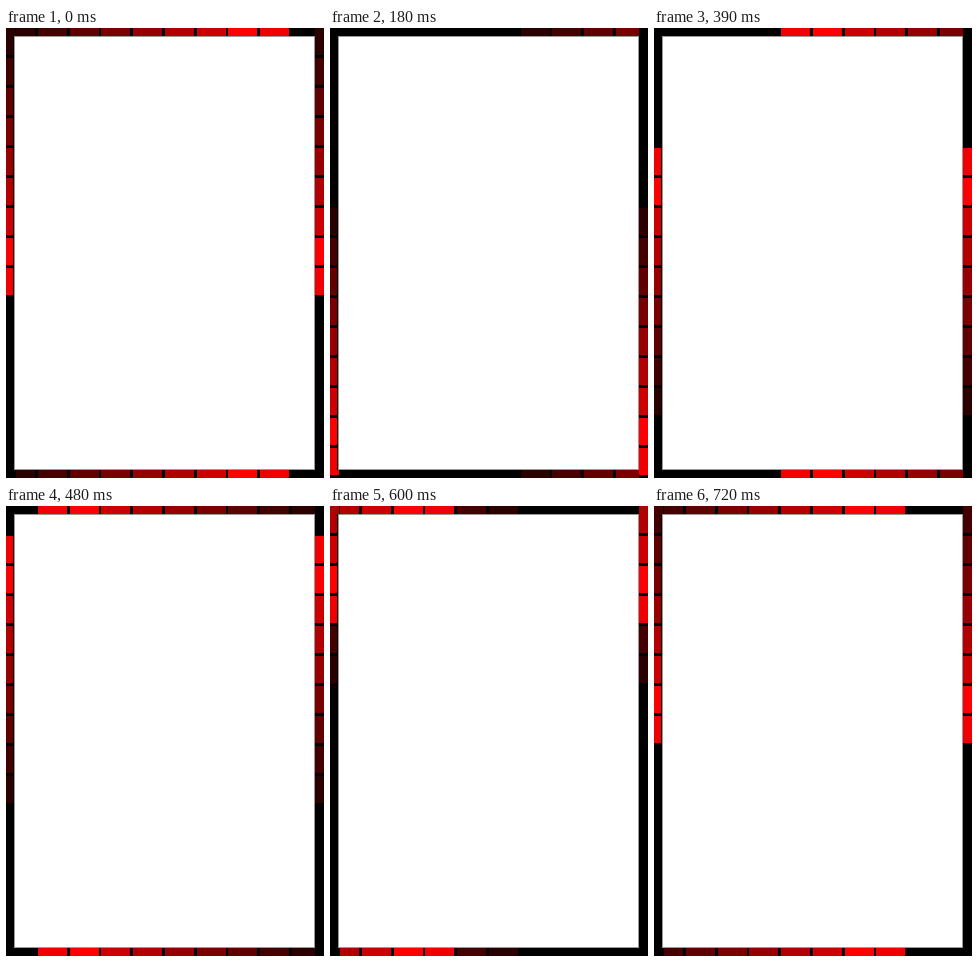
Animation, 318 px wide and 450 px high, one loop 750 ms. Source, as an HTML page with a canvas:

```html
<!DOCTYPE html>
<html>
<head>
<meta charset="utf-8">
<style>
html, body { margin: 0; width: 318px; height: 450px; overflow: hidden; background: #000; }
canvas { display: block; }
</style>
</head>
<body>
<canvas id="stage" width="318" height="450"></canvas>
<script>
const ctx = document.getElementById('stage').getContext('2d');
const STEP = 30, STEPS = 25, LAST = 14, CYCLE = 2 * LAST;
const FADE = [240, 253, 204, 178, 150, 122, 96, 68, 42];

function rect(color, x, y, w, h) {
  ctx.fillStyle = color;
  ctx.fillRect(x, y, w, h);
}

// Phase 0 is the top; the light runs at double speed just after the bottom turn.
function phaseAt(step) {
  const p = 8 + step;
  return p + Math.max(0, Math.min(3, p - LAST));
}

// The light bounces between cell 0 and the last cell.
function headAt(phase) {
  const p = (phase + CYCLE) % CYCLE;
  return LAST - Math.abs(LAST - p);
}

function draw(step) {
  const phase = phaseAt(step);
  rect('#000', 0, 0, 318, 450);
  // Oldest first, so the newest pass covers older trails.
  for (let age = FADE.length - 1; age >= 0; age--) {
    const cell = headAt(phase - age);
    const color = `rgb(${FADE[age]},0,0)`;
    const y = cell * 30;
    rect(color, 0, y, 9, 27);
    rect(color, 309, y, 9, 27);
    if (cell < 10) {
      const left = Math.max(10, Math.round(cell * 31.75));
      const right = Math.min(309, Math.round(cell * 31.75 + 29));
      rect(color, left, 0, right - left, 9);
      rect(color, left, 441, right - left, 9);
    }
  }
  // White sheet with a soft grey edge and a thin dark line on its left.
  rect('#000', 7, 8, 1, 434);
  rect('#999', 8, 8, 301, 434);
  rect('#fff', 9, 9, 299, 432);
}

function tick() {
  draw(Math.floor(performance.now() / STEP) % STEPS);
  requestAnimationFrame(tick);
}
tick();
</script>
</body>
</html>
```
